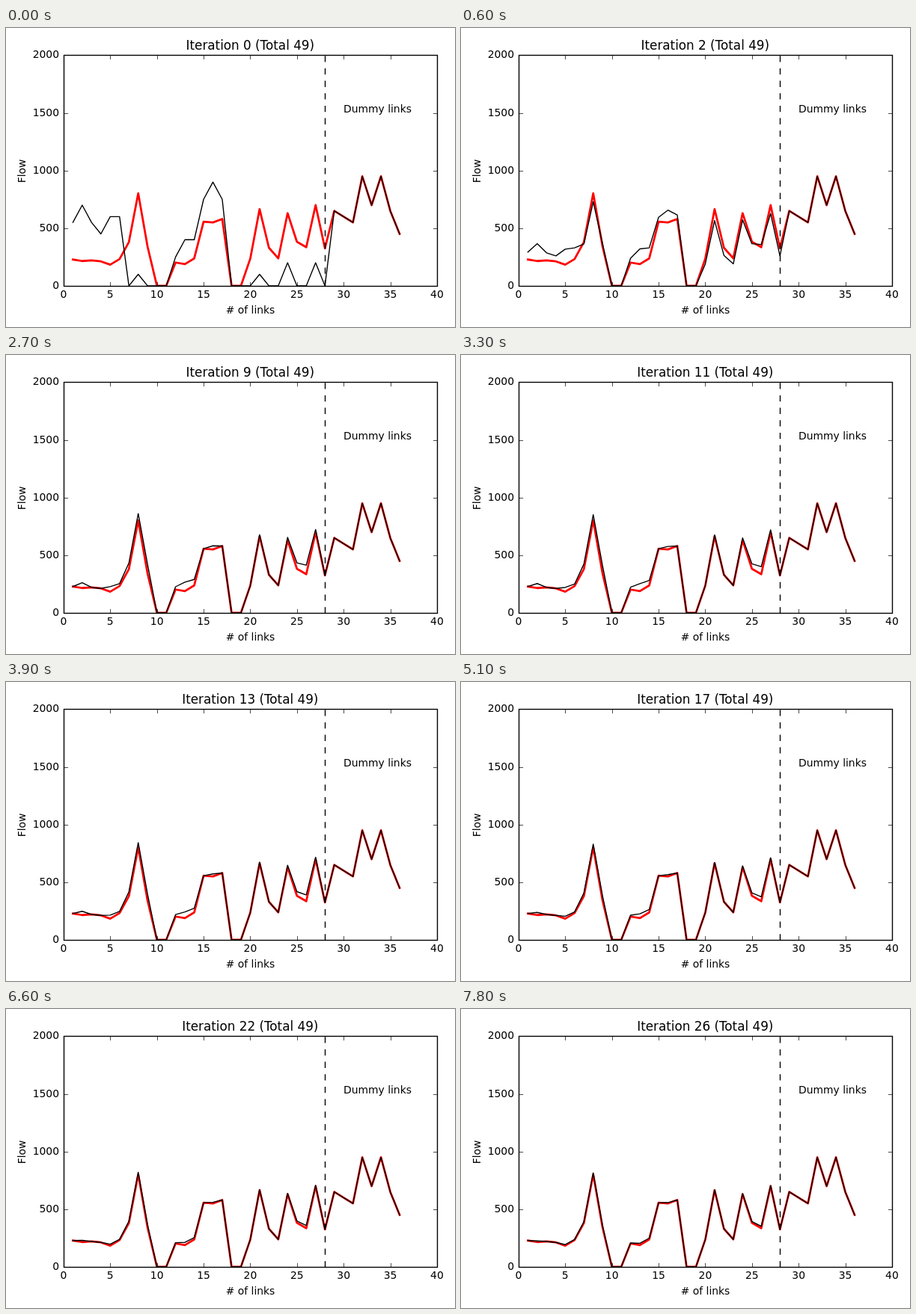
Write an HTML page that moves like this. It is 600 px wide and 400 px high and loops after 8000 ms.

```html
<!DOCTYPE html>
<html lang="en">
<head>
<meta charset="utf-8">
<title>Link flows by iteration</title>
<style>
  html, body { margin: 0; width: 100%; height: 100%; overflow: hidden; background: #fff; }
  svg { display: block; width: 600px; height: 400px; }
  text { font: 13.89px "DejaVu Sans", sans-serif; fill: #000; }
  .title { font-size: 16.8px; }
  .mid { text-anchor: middle; }
  .end { text-anchor: end; }
  path, rect { fill: none; stroke: #000; stroke-width: 1.39; }
  .flow { stroke-linejoin: round; stroke-linecap: square; }
  #fixed { stroke: #f00; stroke-width: 2.78; }
  #ticks { stroke-width: .7; }
</style>
</head>
<body>
<svg id="chart" viewBox="0 0 600 400">
  <clipPath id="area"><rect x="77" y="36" width="500" height="309"/></clipPath>
  <g clip-path="url(#area)">
    <path id="fixed" class="flow"/>
    <path id="current" class="flow"/>
    <path d="M426.5 345.5V36.5" stroke-dasharray="8.33 8.33"/>
  </g>
  <rect x="77.5" y="36.5" width="499" height="309"/>
  <path id="ticks"/>
  <text id="title" class="title mid" x="326.3" y="29"></text>
  <text class="mid" x="326.5" y="382">#&#160;of links</text>
  <text class="mid" transform="translate(26 191.5) rotate(-90)">Flow</text>
  <text x="451" y="113">Dummy links</text>
</svg>
<script>
const STEP = 300, LOOP = 8000, LINKS = 36;
const $ = id => document.getElementById(id);
const px = n => 76.9 + n * 12.475;
const py = v => 344.9 - v * 0.1542;
const snap = p => Math.round(p) + 0.5;

// Runs of values keyed by their first link; every other link is zero.
function runs(parts) {
  const flow = Array(LINKS).fill(0);
  for (const first in parts)
    parts[first].forEach((v, i) => { flow[first - 1 + i] = v; });
  return flow;
}

const dummy = [650, 600, 550, 950, 700, 950, 650, 450];
const goal = runs({
  1: [228, 215, 220, 212, 183, 232, 380, 802, 340],
  12: [202, 188, 238, 556, 550, 580],
  20: [235, 665, 330, 238, 630, 382, 335, 700, 325],
  29: dummy
});
const start = runs({
  1: [550, 700, 550, 450, 600, 600], 8: [100],
  12: [250, 400, 400, 750, 900, 750],
  21: [100], 24: [200], 27: [200], 29: dummy
});
// Excess that builds up early and then fades.
const excess = runs({
  2: [67], 5: [64, 30, 75, 85, 115], 12: [35, 112, 74], 16: [45],
  21: [18], 24: [35, 74, 113, 33]
});

function flowAt(n) {
  const first = Math.max(0, 1.2 / (n + 1) - 0.2);
  const rest = (1 - first) * Math.exp(-Math.max(0, n - 5) / 11);
  return goal.map((g, i) => g + (start[i] - g) * first + excess[i] * rest);
}

const line = flow => 'M' + flow
  .map((v, i) => px(i + 1).toFixed(2) + ' ' + py(v).toFixed(2)).join('L');

function label(text, x, y, cls) {
  const el = document.createElementNS('http://www.w3.org/2000/svg', 'text');
  el.setAttribute('x', x);
  el.setAttribute('y', y);
  el.setAttribute('class', cls);
  el.textContent = text;
  $('chart').append(el);
}

function drawAxes() {
  let d = '';
  for (let n = 0; n <= 40; n += 5) {
    const x = snap(px(n));
    d += `M${x} 345.5v-5.6M${x} 36.5v5.6`;
    label(n, px(n), 361, 'mid');
  }
  for (let v = 0; v <= 2000; v += 500) {
    const y = snap(py(v));
    d += `M77.5 ${y}h5.6M576.5 ${y}h-5.6`;
    label(v, 71, Math.floor(py(v) + 4.5), 'end');
  }
  $('ticks').setAttribute('d', d);
  $('fixed').setAttribute('d', line(goal));
}

let shown = -1;
function show(time) {
  const n = Math.floor(time % LOOP / STEP);
  if (n === shown) return;
  shown = n;
  $('title').textContent = `Iteration ${n} (Total 49)`;
  $('current').setAttribute('d', line(flowAt(n)));
}

drawAxes();
const begin = performance.now();
(function tick() {
  show(performance.now() - begin);
  requestAnimationFrame(tick);
})();
</script>
</body>
</html>
```
